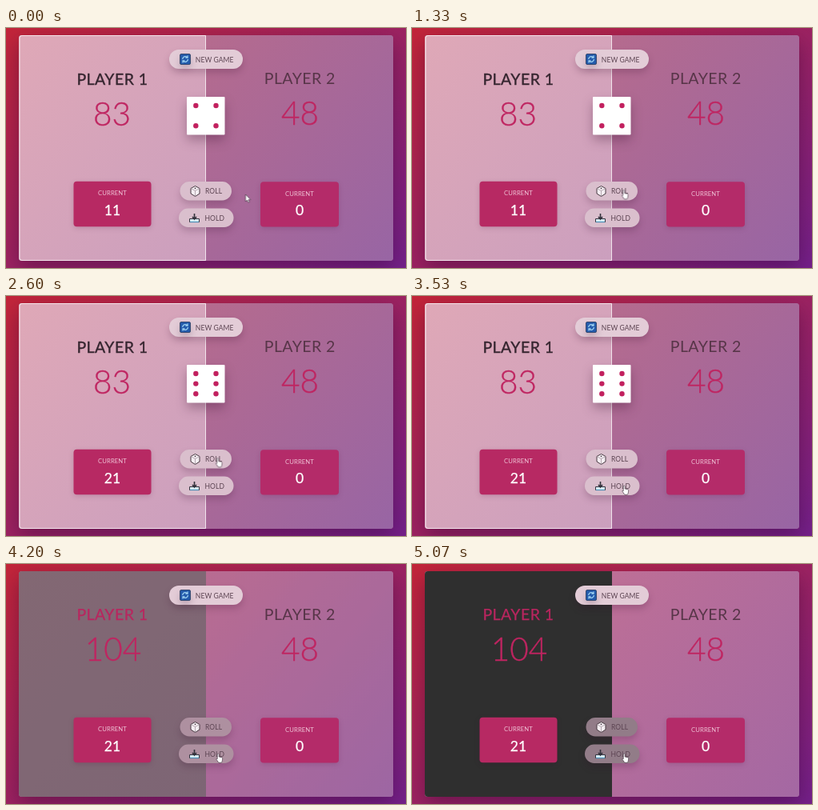
These frames come from a looping animation (500x300 px, 5.14 s). An HTML page:

```html
<!DOCTYPE html>
<html lang="en">
<head>
<meta charset="utf-8">
<title>Dice game</title>
<style>
  html, body { margin: 0; width: 100%; height: 100%; overflow: hidden; }
  body { background: linear-gradient(to top left, #74208a, #c32539); }
  svg { display: block; width: 500px; height: 300px; font-family: Lato, "Open Sans", sans-serif; text-anchor: middle; }
  svg * { animation-duration: 5140ms; animation-iteration-count: infinite; }

  .name { font-size: 19.5px; letter-spacing: .45px; fill: #573548; }
  .score { font-size: 40.5px; font-weight: 300; fill: #bf2561; stroke: #bf2561; stroke-width: .4px; }
  .label { font-size: 7.7px; letter-spacing: .1px; fill: #efc3d6; }
  .value { font-size: 17.5px; fill: #fff; stroke: #fff; stroke-width: .25px; }
  .btn text { font-size: 8.5px; letter-spacing: .1px; text-anchor: start; fill: #5d4553; }
  .btn > rect { filter: drop-shadow(0 5px 4px rgba(50, 10, 40, .2)); }
  .bold { fill: #35252f; stroke: #35252f; stroke-width: .35px; }
  .won { fill: #b9265f; stroke: #b9265f; stroke-width: .25px; }

  /* hard changes: two rolls, then hold */
  .first, .second, .third, .four, .six, .before, .after, .arrow, .hand { animation-timing-function: step-end; }
  .first { animation-name: first; }
  .second { animation-name: second; }
  .third { animation-name: third; }
  .four { animation-name: four; }
  .six { animation-name: six; }
  .before { animation-name: before; }
  .after { animation-name: after; }
  .arrow { animation-name: arrow; }
  .hand { animation-name: hand; }
  @keyframes first { 0% { opacity: 1 } 27.2%, 100% { opacity: 0 } }
  @keyframes second { 0% { opacity: 0 } 27.2% { opacity: 1 } 42.8%, 100% { opacity: 0 } }
  @keyframes third { 0% { opacity: 0 } 42.8%, 100% { opacity: 1 } }
  @keyframes four { 0% { opacity: 1 } 42.8%, 100% { opacity: 0 } }
  @keyframes six { 0% { opacity: 0 } 42.8% { opacity: 1 } 77.8%, 100% { opacity: 0 } }
  @keyframes before { 0% { opacity: 1 } 77.8%, 100% { opacity: 0 } }
  @keyframes after { 0% { opacity: 0 } 77.8%, 100% { opacity: 1 } }
  @keyframes arrow { 0% { opacity: 1 } 6.5%, 100% { opacity: 0 } }
  @keyframes hand { 0% { opacity: 0 } 6.5%, 100% { opacity: 1 } }

  /* winner fade, 750 ms */
  .fade { animation-name: fade; }
  .dim { fill: #dabfcd; animation-name: dim; }
  @keyframes fade {
    0%, 77.8% { opacity: 0; animation-timing-function: ease; }
    92.4%, 100% { opacity: 1; }
  }
  @keyframes dim {
    0%, 77.8% { fill: #dabfcd; animation-timing-function: steps(1, start); }
    79.1% { fill: #bb99aa; animation-timing-function: ease-out; }
    92.4%, 100% { fill: #927c88; }
  }

  .pointer { animation-name: pointer; }
  @keyframes pointer {
    0%, 1.3% { transform: translate(299.5px, 208px); animation-timing-function: ease-in-out; }
    10.3% { transform: translate(270px, 205px); }
    15.6%, 54.5% { transform: translate(264.5px, 202.5px); animation-timing-function: ease-in-out; }
    62.3%, 100% { transform: translate(265px, 237px); }
  }
</style>
</head>
<body>
<svg viewBox="0 0 500 300">
  <defs>
    <linearGradient id="left" x2="1" y2="1"><stop stop-color="#dfa8b7"/><stop offset="1" stop-color="#cb9fbe"/></linearGradient>
    <linearGradient id="idle" x2="1" y2="1"><stop stop-color="#c796ab"/><stop offset="1" stop-color="#bd92ae"/></linearGradient>
    <linearGradient id="right" x2="1" y2="1"><stop stop-color="#b56b8e"/><stop offset="1" stop-color="#9865a4"/></linearGradient>
    <linearGradient id="pink" x2="1" y2="1"><stop stop-color="#bd6f96"/><stop offset="1" stop-color="#a468a3"/></linearGradient>
    <clipPath id="board"><rect x="16" y="9" width="468" height="282" rx="4"/></clipPath>
    <circle id="pip" r="3.2" fill="#c2215f"/>
    <g id="sides">
      <use href="#pip" x="237.3" y="97"/><use href="#pip" x="262.5" y="97"/>
      <use href="#pip" x="237.3" y="122.2"/><use href="#pip" x="262.5" y="122.2"/>
    </g>
  </defs>

  <rect x="16" y="9" width="468" height="282" rx="4" fill="#a85f8c" style="filter:drop-shadow(0 9px 13px rgba(40,0,40,.38))"/>
  <g clip-path="url(#board)">
    <rect x="250" y="9" width="234" height="282" fill="url(#right)"/>
    <rect class="fade" x="250" y="9" width="234" height="282" fill="url(#pink)"/>
    <rect x="16" y="9" width="234" height="282" fill="url(#idle)"/>
    <rect class="before" x="16" y="9" width="234" height="282" fill="url(#left)"/>
    <rect class="fade" x="16" y="9" width="234" height="282" fill="#2f2f2f"/>
  </g>
  <path class="before" d="M249.5 9.5H20q-3 0-3 3V287.500q0 3 3 3H249.500Z" fill="none" stroke="#fff" stroke-opacity=".7"/>

  <g class="before">
    <text class="name bold" x="133" y="71">PLAYER 1</text>
    <text class="score" x="132.500" y="122">83</text>
  </g>
  <g class="after">
    <text class="name won" x="133" y="70">PLAYER 1</text>
    <text class="score" x="134" y="121">104</text>
  </g>
  <text class="name" x="367.300" y="70">PLAYER 2</text>
  <text class="score" x="367.500" y="121">48</text>

  <g style="filter:drop-shadow(0 2px 3px rgba(60,0,40,.15))">
    <rect x="84.500" y="191.700" width="97" height="56.500" rx="4" fill="#b72963"/>
    <rect x="318" y="192.300" width="98" height="56.200" rx="4" fill="#b42b69"/>
  </g>
  <text class="label" x="133" y="209">CURRENT</text>
  <text class="label" x="367" y="209.500">CURRENT</text>
  <text class="value first" x="133" y="233.500">11</text>
  <text class="value second" x="133" y="233.500">15</text>
  <text class="value third" x="133" y="233.500">21</text>
  <text class="value" x="367" y="234">0</text>

  <g class="before">
    <rect x="226" y="86" width="47.500" height="47.500" rx="1" fill="#fff" style="filter:drop-shadow(0 7px 7px rgba(50,10,40,.3))"/>
    <use class="four" href="#sides"/>
    <g class="six">
      <use href="#sides"/><use href="#pip" x="237.300" y="109.600"/><use href="#pip" x="262.500" y="109.600"/>
    </g>
  </g>

  <g class="btn">
    <rect x="204" y="27" width="92" height="24" rx="12" fill="#e3ccd7"/>
    <rect x="217.500" y="32.500" width="13" height="13" rx="1.500" fill="#245bab" stroke="#253a5e" stroke-width=".8"/>
    <path d="M220.700 39a3.400 3.400 0 0 1 5.800-2.400M227.400 39a3.400 3.400 0 0 1-5.800 2.400M227 34.500v2.600h-2.600M221 43.500v-2.600h2.600" fill="none" stroke="#9dd2f2" stroke-width="1.300"/>
    <text x="236.800" y="42.500">NEW GAME</text>
  </g>
  <g class="btn">
    <rect class="dim" x="217.500" y="192" width="64.500" height="23.500" rx="11.700"/>
    <path d="M236.500 197.500l5.500 3v6.500l-5.500 3.500l-5.500-3.500v-6.500Z" fill="#f4eef2" stroke="#493a43" stroke-width="1"/>
    <path d="M231 200.500l5.500 3l5.500-3M236.500 203.500v7" fill="none" stroke="#9b8b95" stroke-width=".7"/>
    <circle cx="236.500" cy="200.300" r=".9" fill="#493a43"/>
    <text x="249" y="207.300">ROLL</text>
  </g>
  <g class="btn">
    <rect class="dim" x="216" y="225.500" width="68.500" height="23.500" rx="11.700"/>
    <path d="M229.500 238.500h12v4h-12Z" fill="#d8edf5" stroke="#34343f" stroke-width="1"/>
    <path d="M230 242.500h11" stroke="#4d91b8" stroke-width="1.200"/>
    <path d="M235.500 232v6M233 236l2.500 3l2.500-3" fill="none" stroke="#30303a" stroke-width="1.600"/>
    <text x="248.500" y="240.800">HOLD</text>
  </g>

  <g class="pointer" stroke="#4a3947" stroke-width=".7" fill="#fff" stroke-linejoin="round">
    <path class="arrow" d="M0 0V9l2-1.800l1.400 3l1.500-.7l-1.400-2.800h2.700Z"/>
    <path class="hand" d="M-.8.600q1-1.300 2 0V4l3.200.700q1.400.400 1.300 1.800l-.5 3q-.2 1.500-1.200 1.800H.8L-2 7.300q-.4-1.300.7-1.100l.5.500Z"/>
  </g>
</svg>
</body>
</html>
```
